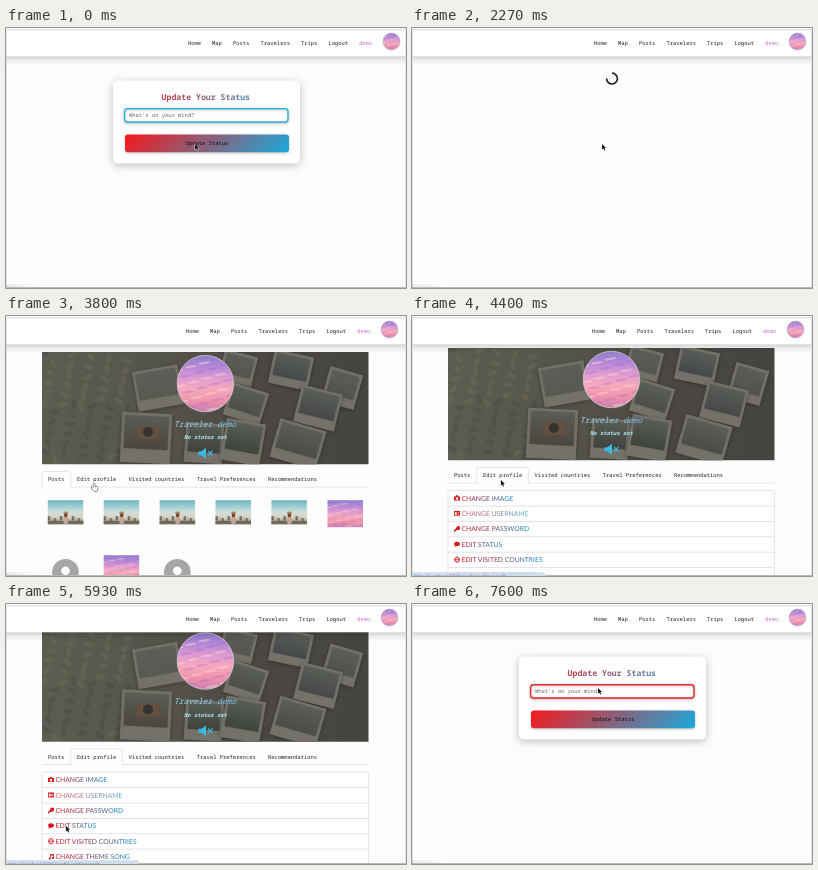
Recreate the animation shown at these times as an HTML page with a canvas. Size 400 by 260 pixels, loop 8000 ms.

```html
<!DOCTYPE html>
<html lang="en">
<head>
<meta charset="utf-8">
<title>Status update</title>
<style>
  html, body { margin: 0; width: 100%; height: 100%; overflow: hidden; background: #fdfdfd; }
  canvas { display: block; width: 400px; height: 260px; }
</style>
</head>
<body>
<canvas id="stage" width="400" height="260"></canvas>
<script>
const ctx = document.getElementById('stage').getContext('2d');
ctx.textRendering = 'geometricPrecision';

const LOOP = 8000;
const MONO = '"Noto Sans Mono", "DejaVu Sans Mono", monospace';
const SANS = 'Lato, "Open Sans", sans-serif';
const RED = '#f5191c', BLUE = '#1ba9dc', INK = '#222';
const USER = 'demo';

// Moments at which the page changes
const LOADING = 1330, PROFILE = 2600, POSTS = 3070, EDIT_TAB = 4050, FORM = 6130;
const LINK_HINT = [3930, 6600], HAND = [3560, 4200], FOCUS = 7070, CARET_OFF = 7600;

const POINTER = [
  [0, 189, 116], [70, 189, 116], [270, 190, 116], [2700, 190, 116],
  [3600, 88, 168], [4150, 88, 168], [4600, 89.5, 161],
  [4940, 89.5, 161], [5560, 60, 222], [6530, 60, 222], [7150, 186, 84]
];
const SCROLL = [[4200, 0], [4700, 11.5], [5000, 11.5], [5500, 10.5]];

function track(keys, t) {
  const next = keys.findIndex(k => k[0] > t);
  if (next === 0) return keys[0].slice(1);
  if (next < 0) return keys[keys.length - 1].slice(1);
  const a = keys[next - 1], b = keys[next];
  const u = (t - a[0]) / (b[0] - a[0]), e = u * u * (3 - 2 * u);
  return a.slice(1).map((v, i) => v + (b[i + 1] - v) * e);
}
const within = (t, [from, to]) => t >= from && t < to;

function gradient(x0, y0, x1, y1, ...colors) {
  const g = ctx.createLinearGradient(x0, y0, x1, y1);
  colors.forEach((c, i) => g.addColorStop(i / (colors.length - 1), c));
  return g;
}
function text(str, x, y, size, fill = INK, style = '', family = MONO) {
  ctx.font = `${style} ${size}px ${family}`;
  ctx.fillStyle = fill;
  ctx.fillText(str, x, y);
}
function rect(x, y, w, h, fill) {
  ctx.fillStyle = fill;
  ctx.fillRect(x, y, w, h);
}
function rounded(x, y, w, h, r, fill, stroke, width = 1) {
  ctx.beginPath();
  ctx.roundRect(x, y, w, h, r);
  if (fill) { ctx.fillStyle = fill; ctx.fill(); }
  if (stroke) { ctx.strokeStyle = stroke; ctx.lineWidth = width; ctx.stroke(); }
}
function oval(x, y, rx, ry, fill, angle = 0) {
  ctx.beginPath();
  ctx.ellipse(x, y, rx, ry, angle, 0, 7);
  ctx.fillStyle = fill;
  ctx.fill();
}
function shape(d, x, y, fill, stroke, width = 1) {
  const p = new Path2D(d);
  ctx.save();
  ctx.translate(x, y);
  if (stroke) { ctx.strokeStyle = stroke; ctx.lineWidth = width; ctx.stroke(p); }
  if (fill) { ctx.fillStyle = fill; ctx.fill(p); }
  ctx.restore();
}
function shadow(color, blur, dy) {
  ctx.shadowColor = color;
  ctx.shadowBlur = blur;
  ctx.shadowOffsetY = dy;
}

function sunset(x, y, w, h) {
  rect(x, y, w, h, gradient(0, y, 0, y + h, '#8d7fd0', '#b487d8', '#dd9bd2', '#f6a9bd', '#ef93ac', '#c97fb4'));
  ctx.save();
  ctx.beginPath();
  ctx.rect(x, y, w, h);
  ctx.clip();
  for (let i = 0; i < 26; i++) {
    const px = x + w * ((i * 0.381 + 0.1) % 1), py = y + h * (0.1 + i * 0.034);
    oval(px, py, w * 0.11, h * 0.022, i % 2 ? 'rgba(255,212,205,.5)' : 'rgba(160,92,184,.28)', -0.15);
  }
  ctx.restore();
}
function roundSunset(x, y, r, border) {
  ctx.save();
  ctx.beginPath();
  ctx.arc(x, y, r, 0, 7);
  ctx.clip();
  sunset(x - r, y - r, 2 * r, 2 * r);
  ctx.restore();
  ctx.beginPath();
  ctx.arc(x, y, r, 0, 7);
  ctx.strokeStyle = border;
  ctx.lineWidth = 0.8;
  ctx.stroke();
}
function cityPhoto(x, y) {
  rect(x, y, 35.5, 24, gradient(0, y, 0, y + 24, '#6fb3c0', '#9ccdd0', '#cfe0da', '#d6d0c0', '#857d70'));
  for (let i = 0; i < 12; i++) rect(x + i * 3, y + 16 + (i * 5) % 4, 2.5, 4, i % 2 ? '#c2b8a6' : '#6f6f66');
  rect(x, y + 20.5, 35.5, 3.5, '#6e675b');
  oval(x + 18, y + 20, 2.6, 4, '#c9a596');
  oval(x + 18, y + 14.5, 1.8, 2.6, '#6a4536');
  oval(x + 18, y + 12.4, 2.6, 1.2, '#b9835a');
}
function blankFace(x, y) {
  oval(x, y, 13.3, 13.3, '#a6a6a6');
  oval(x, y - 1.5, 4.3, 4.3, '#fff');
  oval(x, y + 11, 8, 5.5, '#fff');
}

function header(dx) {
  rect(0, 28, 400, 10, gradient(0, 28, 0, 38, 'rgba(0,0,0,.17)', 'rgba(0,0,0,.05)', 'rgba(0,0,0,0)'));
  rect(0, 0, 400, 28.3, '#fff');
  rect(0, 1.5, 400, 0.8, '#d2d2d2');
  const links = { Home: 182, Map: 206, Posts: 227, Travelers: 254.5, Trips: 295, Logout: 322.5 };
  for (const name in links) text(name, links[name] + dx, 17.3, 5.46);
  text(USER, 353.3 + dx, 17.3, 5.46, gradient(353 + dx, 0, 367 + dx, 0, '#d45cc0', '#b48ae4'));
  roundSunset(385.5 + dx, 13.5, 8.4, '#b9a5c8');
}

function spinner(x, y, t) {
  const a = (t - 1051) / 750 * 2 * Math.PI;
  ctx.beginPath();
  ctx.arc(x, y, 5.4, a + Math.PI / 4, a + Math.PI * 7 / 4);
  ctx.strokeStyle = INK;
  ctx.lineWidth = 1.7;
  ctx.stroke();
}

function statusForm(t) {
  ctx.save();
  shadow('rgba(0,0,0,.25)', 8, 2);
  rounded(107, 52.5, 187, 83, 5, '#fff');
  ctx.restore();
  text('Update Your Status', 155.6, 72, 8.2, gradient(119, 0, 283, 0, RED, BLUE), '600');
  const focused = t >= FOCUS;
  ctx.save();
  shadow('rgba(0,0,0,.22)', 3, 1);
  rounded(118.6, 80.7, 163.4, 13.3, 3, '#fff', focused ? '#e8262c' : '#2cb4d4', 1.4);
  ctx.restore();
  text("What's on your mind?", 123, 89, 5.46, '#666');
  if (focused && t < CARET_OFF) rect(123.6, 84, 0.8, 7, INK);
  ctx.save();
  shadow('rgba(0,0,0,.25)', 3, 1);
  rounded(119, 106.6, 164, 17.6, 3, gradient(155.6, 70, 246.4, 160.8, RED, BLUE));
  ctx.restore();
  text('Update Status', 179.6, 117.1, 5.5, '#111', '500');
}

// Prints on the desk: centre x, y, width, height, degrees, picture colour
const PRINTS = [
  [152, 72, 46, 40, -10, '#565a51'], [232, 52, 34, 30, 14, '#55544e'],
  [285, 54, 40, 34, 12, '#45484a'], [336, 72, 34, 36, 16, '#53514b'],
  [240, 88, 38, 34, 18, '#4c4f49'], [312, 92, 42, 38, 14, '#454846'],
  [198, 127, 38, 40, 4, '#3f423c'], [237, 126, 40, 42, 10, '#3d443a'],
  [292, 128, 48, 40, 16, '#4a4c47'], [140, 122, 50, 50, 3, '#4b443c']
];
function banner(y) {
  ctx.save();
  ctx.beginPath();
  ctx.rect(36, y, 326.5, 112.3);
  ctx.clip();
  rect(36, y, 327, 113, gradient(36, 0, 362, 0, '#5b5d50', '#56554b', '#4b4843', '#474541'));
  ctx.translate(0, y - 36);
  for (let i = 0; i < 60; i++)
    oval(38 + (i * 37) % 92, 38 + (i * 53) % 108, 5, 2.5, i % 2 ? 'rgba(122,120,98,.28)' : 'rgba(60,66,56,.28)', i);
  for (const [x, py, w, h, deg, color] of PRINTS) {
    ctx.save();
    ctx.translate(x, py);
    ctx.rotate(deg * Math.PI / 180);
    shadow('rgba(0,0,0,.3)', 4, 1);
    rect(-w / 2, -h / 2, w, h, '#74716a');
    shadow('rgba(0,0,0,.2)', 2, 0);
    rect(-w / 2 + 3, -h / 2 + 3, w - 6, h * 0.66, gradient(0, -h / 2, 0, h / 4, '#5b5f59', color));
    ctx.restore();
  }
  rounded(131, 110, 22, 13, 2, '#65503f');
  oval(142, 116, 5, 5, '#35332f');
  ctx.restore();
}

const SPEAKER = 'M0 3.5H3L7.5 0V11L3 7.5H0Z';
const ICONS = [
  'M0 1.2H1.5L2.2 0H3.8L4.5 1.2H6V5.2H0ZM3 1.9a1.3 1.3 0 1 0 .01 0Z',
  'M0 .3H6V5.2H0ZM.8 1.6V4.2H2.7V1.6ZM3.4 1.8V2.4H5.4V1.8ZM3.4 3.3V3.9H5.4V3.3Z',
  'M4 0a2 2 0 1 1-.8 3.8L2.6 4.4H2V5H1.2V5.7H0V4.3L2.2 2.2A2 2 0 0 1 4 0Z',
  'M3 .3C7 .3 7 4.7 3 4.7L.3 5.5L.9 4C-.9 2.3.6.3 3 .3Z',
  '',
  'M2 .9L6 0V4.2A1.1.9 0 1 1 5.2 3.5V1.5L2.8 2V5A1.1.9 0 1 1 2 4.2Z'
];
const ACTIONS = ['CHANGE IMAGE', 'CHANGE USERNAME', 'CHANGE PASSWORD', 'EDIT STATUS', 'EDIT VISITED COUNTRIES', 'CHANGE THEME SONG'];

function actionList(top) {
  rounded(36, top, 326.5, 110, 2, '#fff', '#dedede', 0.8);
  ACTIONS.forEach((label, i) => {
    const mid = top + 7.6 + i * 15.35;
    rect(36, mid + 7.6, 326.5, 0.8, '#dedede');
    if (ICONS[i]) shape(ICONS[i], 42, mid - 2.8, '#d71920');
    else shape('M3 .2a2.7 2.7 0 1 0 .01 0M.3 2.9H5.7M3 .2C1 2 1 4 3 5.6C5 4 5 2 3 .2', 42, mid - 2.8, null, '#d71920', 0.7);
    ctx.globalAlpha = i === 1 ? 0.7 : 1;
    ctx.font = `6.8px ${SANS}`;
    const end = 49.5 + ctx.measureText(label).width;
    text(label, 49.5, mid + 2.5, 6.8, gradient(42, 0, end, 0, '#e8161c', '#7a3f5c', '#0f94c8'), '', SANS);
    ctx.globalAlpha = 1;
  });
}

function postGrid(y) {
  for (let i = 0; i < 5; i++) cityPhoto(41.8 + i * 55.9, y);
  sunset(321.5, y, 35.5, 27);
  blankFace(59.5, y + 72);
  sunset(97.7, y + 55, 35.5, 27);
  blankFace(171.3, y + 72);
}

function tabs(y, active) {
  const items = [['Posts', 42, 36, 28.7], ['Edit profile', 71, 64.8, 51.5], ['Visited countries', 122.6],
    ['Travel Preferences', 190.8], ['Recommendations', 262]];
  rect(36, y + 15.2, 326.5, 0.8, '#dcdfe2');
  const [, , left, width] = items[active];
  rounded(left, y, width, 16, [2, 2, 0, 0], '#fff', '#dcdfe2', 0.8);
  rect(left + 0.4, y + 15, width - 0.8, 2, '#fdfdfd');
  for (const [label, x] of items) text(label, x, y + 9.6, 5.46);
}

function profile(t) {
  const editing = t >= EDIT_TAB;
  ctx.save();
  ctx.translate(t < POSTS ? 1 : 0, -track(SCROLL, t)[0]);
  banner(36);
  roundSunset(199.4, 67.6, 28.2, '#d9cfda');
  text('Traveler ' + USER, 168, 110.8, 8, gradient(168, 0, 231, 0, '#a9d3e6', '#6fc0e6'), 'italic');
  text('No status set', 178, 123, 5.5, '#b4e2f2', 'italic 600');
  shape(SPEAKER, 192.5, 131.8, '#3cb9e2');
  shape('M9.5 3.2L14 7.8M14 3.2L9.5 7.8', 192.5, 131.8, null, '#3cb9e2', 1.2);
  tabs(155.5, editing ? 1 : 0);
  if (editing) actionList(178.6);
  else if (t >= POSTS) postGrid(184.2);
  else spinner(199, 179.6, t);
  ctx.restore();
}

function windowEdges(t) {
  rect(0, 0, 0.7, 260, '#dcdcdc');
  rect(399.3, 0, 0.7, 260, '#dcdcdc');
  rect(0, 256, 34, 4, gradient(0, 0, 34, 0, 'rgba(0,0,0,.08)', 'rgba(0,0,0,0)'));
  rect(0, 259, 400, 1, '#b9b9b9');
  if (within(t, LINK_HINT)) {
    rounded(-2, 256.2, 135, 6, 2, '#cfdcea');
    text('http://localhost:3000/profile/settings/edit', 2, 262, 5, '#6d8ba3', '', SANS);
  }
}

function pointer(t) {
  const [x, y] = track(POINTER, t);
  if (within(t, HAND))
    shape('M-.6 0Q.2-.7.8 0V2.4L3.2 3Q4 3.3 3.8 4.4L3.1 7H-.3L-2.2 4.2Q-2 0 -.6 4Z', x, y, '#fff', '#222', 1);
  else
    shape('M0 0V5.6L1.3 4.5L2.2 6.5L3.2 6.1L2.3 4.1H4Z', x, y, '#111', '#fff', 0.8);
}

function draw(t) {
  rect(0, 0, 400, 260, '#fdfdfd');
  if (t < LOADING || t >= FORM) statusForm(t);
  else if (t < PROFILE) spinner(200, 50.6, t);
  else profile(t);
  header(t >= POSTS && t < FORM ? -2 : 0);
  windowEdges(t);
  pointer(t);
}

const start = performance.now();
function frame() {
  draw((performance.now() - start) % LOOP);
  requestAnimationFrame(frame);
}
frame();
</script>
</body>
</html>
```
